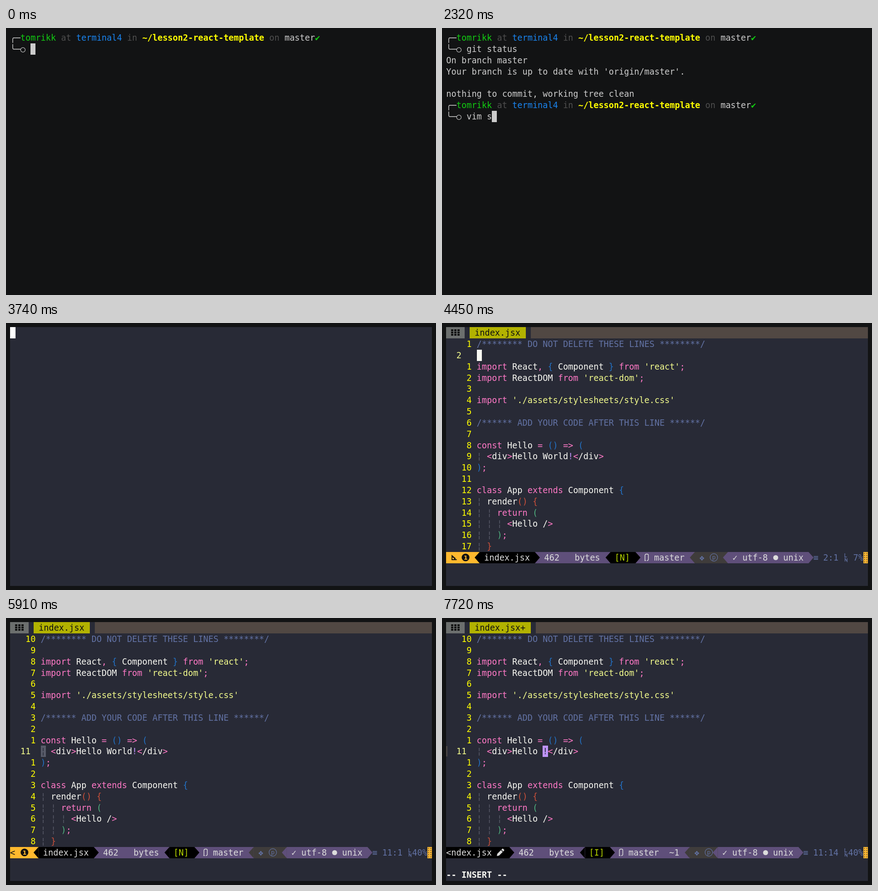
Animation of 949x590 px, one loop 8 s. Source, as an HTML page with a canvas:

```html
<!DOCTYPE html>
<html lang="en">
<head>
<meta charset="utf-8">
<title>Terminal session</title>
<style>
html, body { margin: 0; width: 100%; height: 100%; overflow: hidden; background: #121314; }
canvas { display: block; }
</style>
</head>
<body>
<canvas id="screen" width="949" height="590"></canvas>
<script>
const ctx = document.getElementById('screen').getContext('2d');
const W = 11.21, H = 24.83, PAD = 9.33, LOOP = 8000;
const FONT = "18.67px 'DejaVu Sans Mono', 'DejaVu Sans', monospace";
const VIM = '#282a36', SHELL = '#121314', PURPLE = '#5f4f7a', BROWN = '#3f3c3b', GOLD = '#ffb92e';

// Colour keys used in markup as ^key
const INK = {
  w: '#f8f8f2', p: '#ff79c6', y: '#f1fa8c', c: '#6272a4', v: '#bd93f9', b: '#2372c6',
  r: '#c9503a', g: '#50b380', d: '#585b69', m: '#8f8f8f', n: '#ffff00',
  s: '#cccccc', u: '#12cc12', h: '#1a84ee', k: '#4e4e4e', l: '#dcdcdc', f: '#b4d300'
};

const PROMPT = '^s╭─^utomrikk ^kat ^hterminal4 ^kin ^n*~/lesson2-react-template ^kon ^smaster^u✔';
const OUTPUT = ['On branch master', "Your branch is up to date with 'origin/master'.", '',
  'nothing to commit, working tree clean'];
const KEYS1 = [60, 140, 230, 310, 510, 600, 700, 790, 880, 980];
const KEYS2 = [1610, 1670, 1730, 1790, 2320, 2450, 2510, 2570, 2830, 2890];
const BLAME = '^m  ❯❯❯ (Jorma Velkanto 1 year ago) Add first version of sources';
const CODE = [
  '^c/******** DO NOT DELETE THESE LINES ********/',
  '',
  "^pimport ^wReact^p, ^b{ ^wComponent ^b} ^pfrom ^y'react'^p;",
  "^pimport ^wReactDOM ^pfrom ^y'react-dom'^p;",
  '',
  "^pimport ^y'./assets/stylesheets/style.css'",
  '',
  '^c/****** ADD YOUR CODE AFTER THIS LINE ******/',
  '',
  '^pconst ^wHello ^p= ^b() ^p=> ^b(',
  '^d¦ ^p<^wdiv^p>^wHello World^v!^p<^w/div^p>',
  '^b)^p;',
  '',
  '^pclass ^wApp ^pextends ^wComponent ^b{',
  '^d¦ ^wrender^r() {',
  '^d¦ ¦ ^preturn ^g(',
  '^d¦ ¦ ¦ ^p<^wHello /^p>',
  '^d¦ ¦ ^g)^p;',
  '^d¦ ^r}'
];

// [time, line, column] of the editor cursor
const MOVES = [[3800, 1, 0], [4450, 2, 0], [5280, 4, 0], [5340, 5, 0], [5420, 6, 0], [5490, 7, 0],
  [5570, 8, 0], [5650, 9, 0], [5850, 10, 0], [5910, 11, 0], [6040, 11, 25], [6420, 11, 24],
  [6680, 11, 23], [6870, 11, 21], [7000, 11, 18], [7460, 11, 13]];

const colX = c => PAD + c * W;
const rowY = r => PAD + r * H;
const baseline = r => rowY(r) + 18.9;
const passed = (times, t) => times.filter(x => x <= t).length;

function box(x0, y0, x1, y1, color) {
  ctx.fillStyle = color;
  x0 = Math.round(x0); y0 = Math.round(y0);
  ctx.fillRect(x0, y0, Math.round(x1) - x0, Math.round(y1) - y0);
}

function block(col, row, color) {
  box(colX(col), rowY(row), colX(col + 1), rowY(row + 1), color);
}

function say(text, x, row, color, bold) {
  ctx.font = (bold ? 'bold ' : '') + FONT;
  ctx.fillStyle = color;
  [...text].forEach((ch, i) => { if (ch !== ' ') ctx.fillText(ch, x + i * W, baseline(row)); });
}

// Draws marked-up text; a cursor inverts the cell it stands on
function line(markup, row, col, cursor = -1) {
  let at = 0;
  for (const part of markup.split('^').slice(1)) {
    const color = INK[part[0]], bold = part[1] === '*' && part[0] === 'n';
    const text = part.slice(bold ? 2 : 1);
    say(text, colX(col + at), row, color, bold);
    const i = cursor - at;
    if (i >= 0 && i < text.length) {
      block(col + cursor, row, color);
      say(text[i], colX(col + cursor), row, VIM);
    }
    at += text.length;
  }
  if (cursor >= at) block(col + cursor, row, INK.w);
}

function prompt(row, cmd) {
  line(PROMPT, row, 0);
  line('^s╰─○ ' + cmd, row + 1, 0);
}

function shell(t) {
  const done = t >= 1080;
  const first = 'git status'.slice(0, passed(KEYS1, t));
  prompt(0, first);
  if (!done) return block(4 + first.length, 1, INK.s);
  OUTPUT.forEach((s, i) => line('^s' + s, 2 + i, 0));
  const n = t >= 2950 ? 18 : passed(KEYS2, t);
  prompt(6, 'vim src/index.jsx '.slice(0, n));
  if (t >= 3680) block(0, 8, INK.s);
  else block(4 + n, 7, INK.s);
}

function tabs(dirty) {
  const end = dirty ? 196 : 185;
  box(9, 9, 50, 34, '#6c6f6e');
  for (let i = 0; i < 9; i++) {
    const x = 20 + i % 3 * 7, y = 14 + Math.floor(i / 3) * 5;
    box(x, y, x + 5, y + 4, '#111');
  }
  box(61, 9, end, 34, '#b2b200');
  say('index.jsx' + (dirty ? '+' : ''), 72, 0, '#111');
  box(end + 11, 9, 940, 34, '#514843');
}

function arrow(x, dir, color) {
  const top = rowY(20), tip = dir < 0 ? x : x + 11, back = dir < 0 ? x + 11 : x;
  ctx.fillStyle = color;
  ctx.beginPath();
  ctx.moveTo(tip, top + H / 2);
  ctx.lineTo(back, 506);
  ctx.lineTo(back, 531);
  ctx.fill();
}

function disc(x, y, r, color) {
  ctx.fillStyle = color;
  ctx.beginPath();
  ctx.arc(x, y, r, 0, 7);
  ctx.fill();
}

function stroke(path, color, width) {
  ctx.strokeStyle = color;
  ctx.lineWidth = width;
  ctx.stroke(new Path2D(path));
}

function pencil(x) {
  ctx.fillStyle = INK.l;
  ctx.fill(new Path2D(`M${x} 526l1-5 8-8 4 4-8 8zM${x + 10} 512l2-2q1-1 2 0l2 2q1 1 0 2l-2 2z`));
}

function status(ln, col, insert, dirty, signs) {
  const wide = ln > 9;
  const L = signs ? -56.5 : wide ? -11.2 : 0;
  const B = wide ? -11.2 : 0;
  const R = insert ? -22.4 : B;
  const bar = (a, b, color) => box(a, 506, b, 531, color);
  const put = (s, x, color = INK.l) => say(s, x, 20, color);
  const name = 93 + L - (dirty ? 27 : 0);

  bar(9, 809 + R, PURPLE);
  bar(9, 205 + L, '#000');
  if (!signs) {
    bar(9, name - 10, GOLD);
    arrow(name - 21, -1, '#000');
    if (wide) put('<', 9, '#111');
    else stroke('M21 523H32.5M22 523V514L30 521M22 517Q27 517 28 522', '#111', 1.8);
    if (!dirty) {
      disc(52 + L, 518, 8.6, '#111');
      ctx.font = "bold 13px 'DejaVu Sans', sans-serif";
      ctx.fillStyle = GOLD;
      ctx.fillText('1', 47.7 + L, 523);
    }
    put('index.jsx', name);
  } else {
    put('<ndex.jsx', 9);
  }
  if (dirty) pencil(name + 111.5);
  arrow(205 + L, 1, '#000');
  put('462   bytes', 225.5 + L);

  arrow(361 + L, -1, '#000');
  bar(372 + L, 427 + L, '#000');
  arrow(427 + L, 1, '#000');
  put(insert ? '[I]' : '[N]', 381 + L, INK.f);
  const g = 448 + L;
  stroke(`M${g} 525V514Q${g} 510.5 ${g + 4} 510.5T${g + 7.5} 514V522Q${g + 7.5} 525 ${g + 4} 525M${g - 1} 525H${g + 2}`, INK.l, 1.5);
  put('master' + (signs ? '  ~1' : ''), 468 + L);

  arrow(547 + B, -1, BROWN);
  bar(558 + B, 620 + R, BROWN);
  bar(620 + R, 631 + R, BROWN);
  arrow(620 + R, -1, PURPLE);
  put('❖', 568 + B, INK.c);
  ctx.strokeStyle = INK.c;
  ctx.lineWidth = 1.2;
  ctx.beginPath();
  ctx.arc(600 + B, 518, 8.3, 0, 7);
  ctx.stroke();
  ctx.font = "12px 'DejaVu Sans', sans-serif";
  ctx.fillStyle = INK.c;
  ctx.fillText('p', 596.3 + B, 521.5);

  put('✓', 641 + R);
  put('utf-8', 663 + R);
  disc(736.5 + R, 518.5, 5.5, INK.l);
  put('unix', 753 + R);
  arrow(809 + R, 1, PURPLE);

  const pos = ln + ':' + (col + 1);
  const pct = Math.floor(ln / 27 * 100) + '%';
  put('≡', 819.5 + R, INK.c);
  put(pos, 875 - pos.length * W, INK.c);
  put(pct, 930 - pct.length * W, INK.c);
  stroke('M889 509V517H893.5M889.5 527V520L894 527V520', INK.c, 1.3);
  bar(930, 940, GOLD);
  for (let i = 0; i < 10; i++) disc(932.5 + i % 2 * 5, 509 + (i >> 1) * 4.7, 1.1, '#4b3b46');
}

function editor(t) {
  box(9, 9, 940, 581, VIM);
  if (t < 3800) return block(0, 0, '#fff');
  const [, ln, col] = MOVES[passed(MOVES.map(m => m[0]), t) - 1];
  const insert = t >= 6040, dirty = t >= 7460, signs = t >= 7720;

  tabs(dirty);
  CODE.forEach((src, i) => {
    const row = i + 1, here = row === ln;
    let text = src;
    if (row === 2 && t >= 5020 && t < 5850) text = BLAME;
    if (row === 11 && dirty) text = src.replace('World', '');
    const num = String(here ? ln : Math.abs(row - ln));
    line((here ? '^y' : '^n') + num, row, here ? 2 : 5 - num.length);
    line(text, row, 6, here ? col : -1);
  });
  if (signs) box(9, 283, 12, 306, '#4b4645');
  status(ln, col, insert, dirty, signs);
  if (insert && !(t >= 7460 && t < 7520)) say('-- INSERT --', colX(0), 22, INK.w, true);
}

function draw(now) {
  const t = now % LOOP;
  box(0, 0, 949, 590, SHELL);
  if (t < 3740) shell(t);
  else editor(t);
  requestAnimationFrame(draw);
}

let start;
requestAnimationFrame(function begin(now) {
  start = now;
  const tick = time => { paint(time - start); requestAnimationFrame(tick); };
  tick(now);
});

function paint(ms) {
  const t = ms % LOOP;
  box(0, 0, 949, 590, SHELL);
  if (t < 3740) shell(t);
  else editor(t);
}
</script>
</body>
</html>
```
